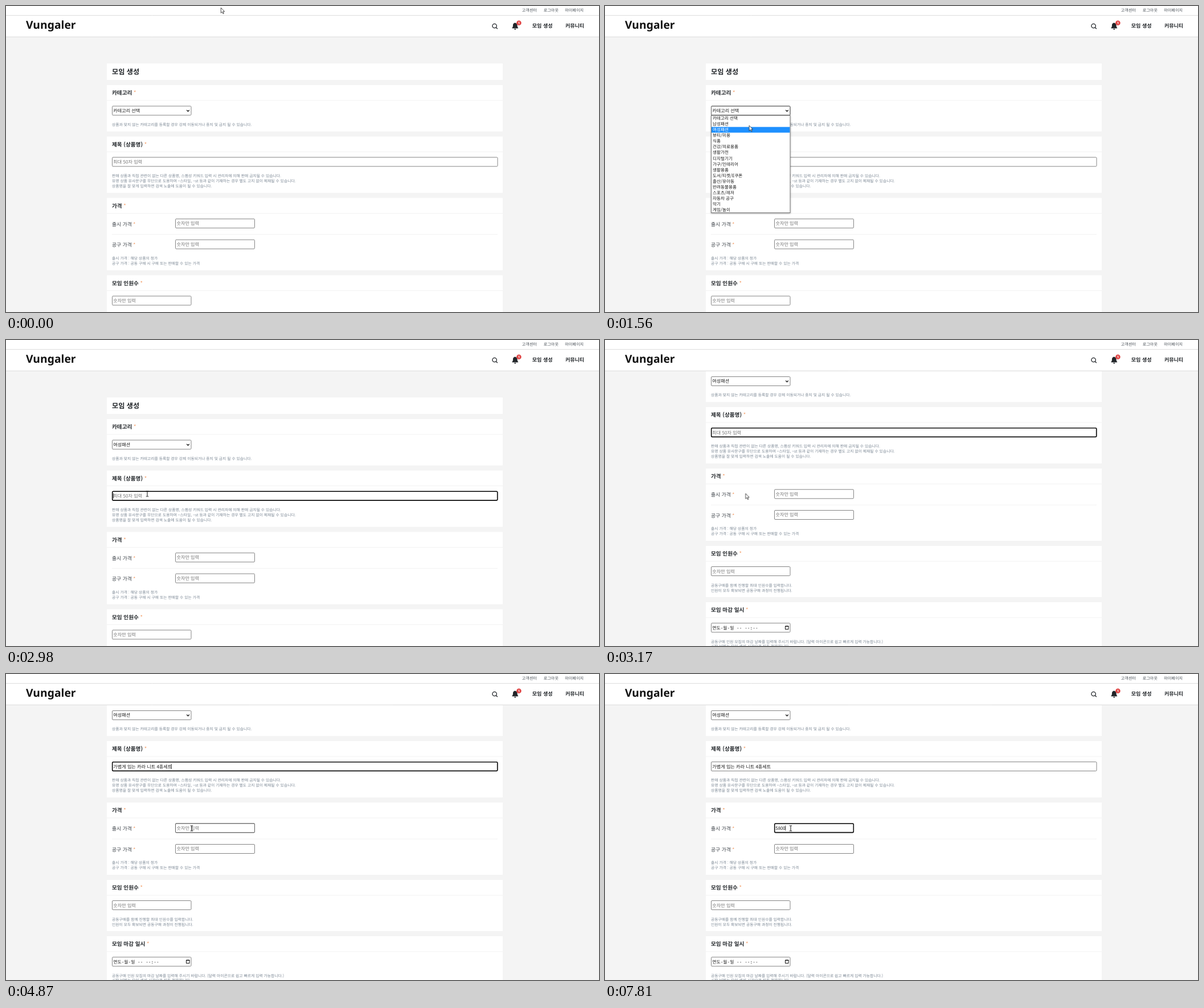
An HTML page for the animation above (8 s loop, 1041 px wide and 538 px high).

```html
<!DOCTYPE html>
<html lang="ko">
<head>
<meta charset="utf-8">
<title>모임 생성</title>
<style>
  html, body { margin: 0; width: 100%; height: 100%; overflow: hidden; background: #f4f4f4; }
  svg { display: block; width: 1041px; height: 538px; font-family: "Noto Sans CJK KR", "Noto Sans", sans-serif; text-rendering: geometricPrecision; }
  .card { fill: #fff; }
  .sep { stroke: #f2f2f2; }
  .box { fill: #fff; stroke: #767676; stroke-width: .9; }
  .hover { fill: none; stroke: #5a5a5a; stroke-width: .9; }
  .ring { fill: none; stroke: #101010; stroke-width: 1.6; }
  .h1 { font-size: 12.2px; font-weight: 700; fill: #212529; }
  .h2 { font-size: 9.6px; font-weight: 700; fill: #212529; }
  .row { font-size: 8.8px; fill: #343a40; }
  .star { fill: #f39a62; font-weight: 400; }
  .note { font-size: 6.8px; fill: #7b8794; }
  .hint { font-size: 8.1px; fill: #757575; }
  .value { font-size: 8.1px; fill: #1a1a1a; }
  .digits { font-size: 7.8px; }
  .date { font: 7.8px "DejaVu Sans Mono", "Noto Sans CJK KR", monospace; }
  .option { font-size: 7.6px; fill: #1a1a1a; }
  .hl rect { fill: #1e90ff; }
  .hl text { fill: #fff; }
  .top { font-size: 7.1px; fill: #495057; }
  .nav { font-size: 9px; font-weight: 700; fill: #212529; }
  .logo { font: 600 19.3px "Noto Sans", sans-serif; fill: #111; }
  .badge { font: 700 6px "Noto Sans", sans-serif; fill: #fff; text-anchor: middle; }
  .caret { fill: #111; }

  /* hard switches */
  .sw { animation: 8s step-end infinite; }
  #page { animation-name: scroll; }
  #popup { animation-name: popup; }
  #hl0 { animation-name: hl0; }
  #hl1 { animation-name: hl1; }
  #hl2 { animation-name: hl2; }
  #unpicked { animation-name: unpicked; }
  #picked { animation-name: picked; }
  #selHover { animation-name: selHover; }
  #selRing { animation-name: selRing; }
  #titleRing { animation-name: titleRing; }
  #titleHint { animation-name: titleHint; }
  #titleText { animation-name: titleText; }
  #caretStart { animation-name: caretStart; }
  #caretEnd { animation-name: caretEnd; }
  #priceHover { animation-name: priceHover; }
  #priceRing { animation-name: priceRing; }
  #priceHint { animation-name: priceHint; }
  #priceCaret { animation-name: priceCaret; }
  #d1 { animation-name: d1; }
  #d2 { animation-name: d2; }
  #d3 { animation-name: d3; }
  #d4 { animation-name: d4; }
  #arrow { animation-name: arrow; }
  #beam { animation-name: beam; }
  #mouse { animation: mouse 8s linear infinite; }

  @keyframes scroll { 0% { transform: none } 38.875% { transform: translateY(-60px) } 39.625%, 100% { transform: translateY(-111.5px) } }
  @keyframes popup { 0%, 24.75%, 100% { visibility: hidden } 12% { visibility: visible } }
  @keyframes hl0 { 0%, 16.75%, 100% { visibility: hidden } 12% { visibility: visible } }
  @keyframes hl1 { 0%, 18.75%, 100% { visibility: hidden } 16.75% { visibility: visible } }
  @keyframes hl2 { 0%, 24.75%, 100% { visibility: hidden } 18.75% { visibility: visible } }
  @keyframes unpicked { 0% { visibility: visible } 24.75%, 100% { visibility: hidden } }
  @keyframes picked { 0% { visibility: hidden } 24.75%, 100% { visibility: visible } }
  @keyframes selHover { 0%, 24.75%, 100% { visibility: hidden } 10.5% { visibility: visible } }
  @keyframes selRing { 0%, 32.75%, 100% { visibility: hidden } 24.75% { visibility: visible } }
  @keyframes titleRing { 0%, 62.5%, 100% { visibility: hidden } 32.75% { visibility: visible } }
  @keyframes titleHint { 0% { visibility: visible } 46.5%, 100% { visibility: hidden } }
  @keyframes titleText { 0% { visibility: hidden } 46.5%, 100% { visibility: visible } }
  @keyframes caretStart { 0%, 39.375%, 100% { visibility: hidden } 32.75% { visibility: visible } }
  @keyframes caretEnd { 0%, 54.125%, 62.5%, 100% { visibility: hidden } 46.5%, 60.875% { visibility: visible } }
  @keyframes priceHover { 0%, 62.5%, 100% { visibility: hidden } 54.5% { visibility: visible } }
  @keyframes priceRing { 0% { visibility: hidden } 62.5%, 100% { visibility: visible } }
  @keyframes priceHint { 0% { visibility: visible } 83.5%, 100% { visibility: hidden } }
  @keyframes priceCaret {
    0%, 69.375%, 82.625%, 90.125% { visibility: hidden; transform: none }
    62.5%, 76% { visibility: visible; transform: none }
    83.5% { visibility: visible; transform: translateX(4.3px) }
    92.625% { visibility: visible; transform: translateX(8.6px) }
    95.125% { visibility: visible; transform: translateX(13px) }
    97.625%, 100% { visibility: visible; transform: translateX(17.3px) }
  }
  @keyframes d1 { 0% { visibility: hidden } 83.5%, 100% { visibility: visible } }
  @keyframes d2 { 0% { visibility: hidden } 92.625%, 100% { visibility: visible } }
  @keyframes d3 { 0% { visibility: hidden } 95.125%, 100% { visibility: visible } }
  @keyframes d4 { 0% { visibility: hidden } 97.625%, 100% { visibility: visible } }
  @keyframes arrow { 0%, 38.875% { visibility: visible } 32.25%, 54.5%, 100% { visibility: hidden } }
  @keyframes beam { 0%, 38.875% { visibility: hidden } 32.25%, 54.5%, 100% { visibility: visible } }
  @keyframes mouse {
    0% { transform: translate(377px, 3px) }
    1.5% { transform: translate(377px, 3px); animation-timing-function: ease-in-out }
    11.125%, 15.25% { transform: translate(276px, 185px) }
    20.375%, 26.5% { transform: translate(248px, 215px); animation-timing-function: ease-in-out }
    29.5% { transform: translate(249px, 374px); animation-timing-function: ease-in-out }
    32.5%, 38.8% { transform: translate(248px, 270.5px) }
    39.625%, 47.375% { transform: translate(246.5px, 269.8px); animation-timing-function: ease-in-out }
    55.125%, 100% { transform: translate(326px, 271.3px) }
  }
</style>
</head>
<body>
<svg viewBox="0 0 1041 538">
  <defs>
    <path id="chevron" d="M-2.3-1.1 0 1.3 2.3-1.1" fill="none" stroke="#111" stroke-width="1.3"/>
  </defs>
  <rect width="1041" height="538" fill="#f4f4f4"/>

  <g id="page" class="sw">
    <g class="card">
      <rect x="177" y="101" width="695" height="29"/>
      <rect x="177" y="139" width="695" height="81.5"/>
      <rect x="177" y="229.5" width="695" height="99"/>
      <rect x="177" y="337.5" width="695" height="127"/>
      <rect x="177" y="473.5" width="695" height="90"/>
      <rect x="177" y="572.5" width="695" height="120"/>
    </g>
    <path class="sep" d="M177 166H872M177 256.5H872M177 364.5H872M186 401.5H863M177 500.5H872M177 599.5H872"/>

    <text class="h1" x="186" y="120.2">모임 생성</text>

    <text class="h2" x="186" y="156.3">카테고리 <tspan class="star">*</tspan></text>
    <rect class="box" x="186.5" y="176" width="138.5" height="16" rx="1.5"/>
    <rect id="selHover" class="hover sw" x="186.5" y="176" width="138.5" height="16" rx="1.5"/>
    <rect id="selRing" class="ring sw" x="186.5" y="176.2" width="138.2" height="15.6" rx="1.8"/>
    <text id="unpicked" class="value sw" x="188.3" y="186.8">카테고리 선택</text>
    <text id="picked" class="value sw" x="188.3" y="186.8">여성패션</text>
    <use href="#chevron" x="319.5" y="184"/>
    <text class="note" x="186" y="210.6">상품과 맞지 않는 카테고리를 등록할 경우 강제 이동되거나 중지 및 금지 될 수 있습니다.</text>

    <text class="h2" x="186" y="246.5">제목 (상품명) <tspan class="star">*</tspan></text>
    <rect class="box" x="186.5" y="266" width="676.5" height="16" rx="1.5"/>
    <rect id="titleRing" class="ring sw" x="186.7" y="266.3" width="676" height="15.6" rx="1.8"/>
    <text id="titleHint" class="hint sw" x="188.3" y="277">최대 50자 입력</text>
    <text id="titleText" class="value sw" x="188.3" y="277">가볍게 입는 카라 니트 4종세트</text>
    <rect id="caretStart" class="caret sw" x="188" y="269.5" width=".8" height="9"/>
    <rect id="caretEnd" class="caret sw" x="289.8" y="269.5" width=".8" height="9"/>
    <text class="note" x="186" y="300.8">판매 상품과 직접 관련이 없는 다른 상품명, 스팸성 키워드 입력 시 관리자에 의해 판매 금지될 수 있습니다.</text>
    <text class="note" x="186" y="309.8">유명 상품 유사문구를 무단으로 도용하여 ~스타일, ~st 등과 같이 기재하는 경우 별도 고지 없이 제재될 수 있습니다.</text>
    <text class="note" x="186" y="318.7">상품명을 잘 맞게 입력하면 검색 노출에 도움이 될 수 있습니다.</text>

    <text class="h2" x="186" y="354.5">가격 <tspan class="star">*</tspan></text>
    <text class="row" x="186" y="386.5">출시 가격 <tspan class="star">*</tspan></text>
    <rect class="box" x="297.5" y="374.3" width="139" height="16" rx="1.5"/>
    <rect id="priceHover" class="hover sw" x="297.5" y="374.3" width="139" height="16" rx="1.5"/>
    <rect id="priceRing" class="ring sw" x="297.7" y="374.5" width="138.6" height="15.6" rx="1.8"/>
    <text id="priceHint" class="hint sw" x="299.5" y="385.2">숫자만 입력</text>
    <text class="value digits" x="299.3" y="385.2"><tspan id="d1" class="sw">5</tspan><tspan id="d2" class="sw">8</tspan><tspan id="d3" class="sw">0</tspan><tspan id="d4" class="sw">0</tspan></text>
    <rect id="priceCaret" class="caret sw" x="299.2" y="378" width=".8" height="8.8"/>
    <text class="row" x="186" y="423.3">공구 가격 <tspan class="star">*</tspan></text>
    <rect class="box" x="297.5" y="411" width="139" height="16" rx="1.5"/>
    <text class="hint" x="299.5" y="421.9">숫자만 입력</text>
    <text class="note" x="186" y="445.6">출시 가격 : 해당 상품의 정가</text>
    <text class="note" x="186" y="454.6">공구 가격 : 공동 구매 시 구매 또는 판매할 수 있는 가격</text>

    <text class="h2" x="186" y="490.5">모임 인원수 <tspan class="star">*</tspan></text>
    <rect class="box" x="186.5" y="510" width="138.5" height="16" rx="1.5"/>
    <text class="hint" x="188.3" y="521">숫자만 입력</text>
    <text class="note" x="186" y="545">공동구매를 함께 진행할 최대 인원수를 입력합니다.</text>
    <text class="note" x="186" y="554">인원이 모두 확보되면 공동구매 과정이 진행됩니다.</text>

    <text class="h2" x="186" y="589.5">모임 마감 일시 <tspan class="star">*</tspan></text>
    <rect class="box" x="186.5" y="609.3" width="138.5" height="16" rx="1.5"/>
    <text class="value date" x="188.3" y="620.2">연도-월-일 -- --:--</text>
    <path d="M316.5 614.5h5.5v5.7h-5.5zM316 615h6.5" fill="none" stroke="#111"/>
    <text class="note" x="186" y="644">공동구매 인원 모집의 마감 날짜를 입력해 주시기 바랍니다. (달력 아이콘으로 쉽고 빠르게 입력 가능합니다.)</text>
    <text class="note" x="186" y="652.8">시작 날짜는 모임 생성 시간으로 자동 적용됩니다.</text>

    <g id="popup" class="sw">
      <rect x="186.5" y="192.5" width="138.5" height="171" fill="#fff" stroke="#777" style="filter: drop-shadow(0 1px 1.5px #0005)"/>
      <g id="options"></g>
    </g>
  </g>

  <g id="header">
    <rect width="1041" height="54" fill="#fff"/>
    <path d="M0 16.5H1041M0 54.3H1041" stroke="#dcdcdc"/>
    <g class="top">
      <text x="905.8" y="10.4">고객센터</text>
      <text x="943.8" y="10.4">로그아웃</text>
      <text x="981.3" y="10.4">마이페이지</text>
    </g>
    <text class="logo" x="35" y="39.6">Vungaler</text>
    <g fill="none" stroke="#212529" stroke-width="1.3">
      <circle cx="857.6" cy="35" r="3.7"/>
      <path d="M860.3 37.7 862.8 40.2"/>
    </g>
    <path d="M893.7 29.4c-3 .5-3.7 2.7-3.7 4.6 0 2.6-.7 3.5-1.6 4.7v.6h10.8v-.6c-.9-1.2-1.6-2.1-1.6-4.7 0-1.9-.9-4.1-3.9-4.6zM892 40h3.6c-.3 2-3.3 2-3.6 0z" fill="#212529"/>
    <circle cx="900.4" cy="29.8" r="4.3" fill="#e04848"/>
    <text class="badge" x="900.4" y="32">1</text>
    <text class="nav" x="923.8" y="38.3">모임 생성</text>
    <text class="nav" x="982" y="38.3">커뮤니티</text>
  </g>

  <g id="mouse">
    <path id="arrow" class="sw" d="M.3 0V9.3L2.5 7.3 4 10.7 5.4 10.1 4 6.8H6.7Z" fill="#fff" stroke="#222" stroke-width=".8"/>
    <path id="beam" class="sw" d="M-2.2-4.6H-.6L0-4.2.6-4.6H2.2M0-4.2V4.2M-2.2 4.6H-.6L0 4.2.6 4.6H2.2" fill="none" stroke="#111"/>
  </g>
</svg>
<script>
  const names = ['카테고리 선택', '남성패션', '여성패션', '뷰티/미용', '식품', '건강/의료용품', '생활가전', '디지털기기',
    '가구/인테리어', '생활용품', '도서/티켓/E쿠폰', '출산/유아동', '반려동물용품', '스포츠/레저', '자동차 공구', '악기', '게임/놀이'];
  const rowHeight = 10.03;
  const label = (name, i) => `<text class="option" x="189" y="${200.3 + i * rowHeight}">${name}</text>`;
  // The first three rows are the ones the pointer passes over.
  const lit = (name, i) =>
    `<g id="hl${i}" class="hl sw"><rect x="187" y="${192.6 + i * rowHeight}" width="137.5" height="10"/>${label(name, i)}</g>`;
  document.getElementById('options').innerHTML =
    names.map(label).join('') + names.slice(0, 3).map(lit).join('');
</script>
</body>
</html>
```
